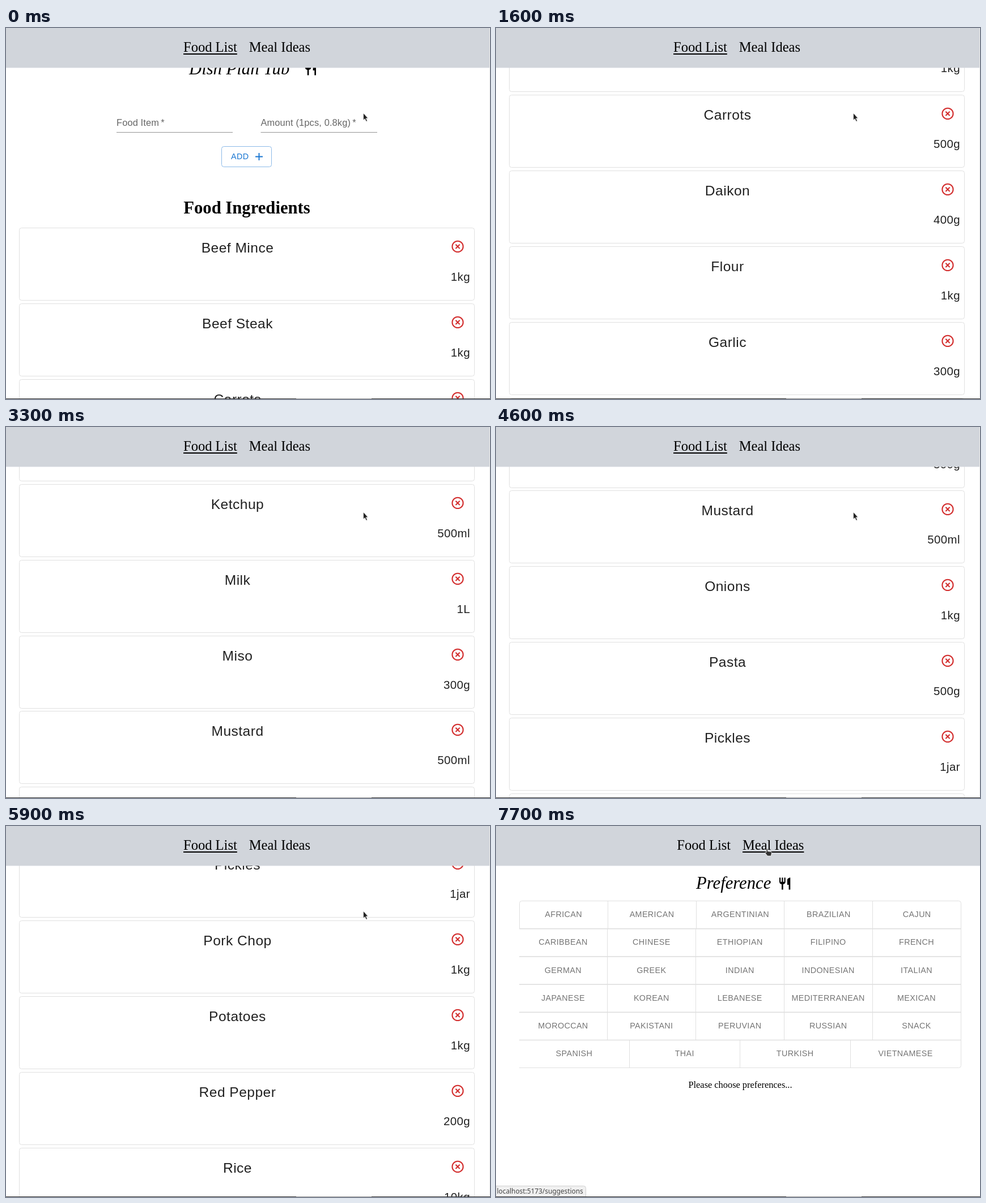
Recreate the animation shown at these times as an HTML page. Size 854 px wide and 656 px high, loop 8000 ms.

```html
<!DOCTYPE html>
<html lang="en">
<head>
<meta charset="utf-8">
<title>Food list</title>
<style>
  html, body { margin: 0; width: 100%; height: 100%; overflow: hidden; background: #fff; }
  svg { display: block; }
  .serif { font-family: "Liberation Serif", serif; }
  .sans { font-family: "Liberation Sans", sans-serif; }
  .nav { font-size: 24.55px; }
  .title { font-size: 30.68px; font-style: italic; }
  .heading { font-size: 30.68px; font-weight: bold; }
  .note { font-size: 16.36px; }
  .label { font-size: 16.36px; letter-spacing: .00938em; fill: #666; }
  .button { font-size: 14.32px; letter-spacing: .02857em; }
  .food { font-size: 24.54px; letter-spacing: .02em; fill: #212121; }
  .amount { font-size: 20.45px; letter-spacing: .02em; fill: #212121; }
  .status { font: 11.85px "Noto Sans", sans-serif; fill: #444; }
  .middle { text-anchor: middle; }
  .end { text-anchor: end; }
  .line { fill: none; stroke: #e0e0e0; }
</style>
</head>
<body>
<svg width="854" height="656" viewBox="0 0 854 656">
  <defs>
    <path id="cutlery" transform="scale(1.07)" d="M11 9H9V2H7v7H5V2H3v7c0 2.12 1.66 3.84 3.75 3.97V22h2.5v-9.03C11.34 12.84 13 11.12 13 9V2h-2v7zm5-3v8h2.5v8H21V2c-2.76 0-5 2.24-5 4z"/>
    <g id="remove" fill="none" stroke="#d32f2f" stroke-width="2.1">
      <circle r="9.6"/>
      <path d="M-3.6-3.6 3.6 3.6M3.6-3.6-3.6 3.6"/>
    </g>
  </defs>

  <g id="foodPage">
    <text class="serif title" x="323" y="111">Dish Plan Tub</text>
    <use href="#cutlery" x="524.5" y="89"/>
    <text class="sans label" x="195" y="202">Food Item<tspan dx="3.3">*</tspan></text>
    <text class="sans label" x="449.5" y="202">Amount (1pcs, 0.8kg)<tspan dx="3.3">*</tspan></text>
    <path d="M195 213.5H400M449.5 213.5H655" stroke="#949494"/>
    <rect x="380.5" y="238.5" width="88" height="36" rx="4" fill="none" stroke="#8cbae8"/>
    <text class="sans button" x="397" y="261" fill="#1976d2">ADD</text>
    <path d="M440 256.5H453M446.5 250V263" stroke="#1976d2" stroke-width="1.9"/>
    <text class="serif heading middle" x="425" y="357">Food Ingredients</text>
    <g id="cards"></g>
  </g>

  <g id="mealPage">
    <text class="serif title" x="353" y="111">Preference</text>
    <use href="#cutlery" x="496.8" y="89"/>
    <path class="line" d="M41.5 181V136.5q0-4 4-4H816.5q4 0 4 4V423.5q0 4-4 4H41"/>
    <g id="cuisines"></g>
    <text class="serif note middle" x="431" y="463">Please choose preferences...</text>
  </g>

  <rect id="scrollbar" x="853" width="1" height="656" fill="#ececec"/>
  <rect id="header" width="853" height="70.4" fill="#d1d5db"/>
  <g id="nav" class="serif nav">
    <text x="313" y="42">Food List</text>
    <text x="428.7" y="42">Meal Ideas</text>
    <rect id="underline" y="45" height="2"/>
  </g>

  <g id="status">
    <path d="M0 636.5H154.5q4 0 4 4V656H0z" fill="#f0f0f0" stroke="#d0d0d0"/>
    <text class="status" x="1.5" y="650">localhost:5173/suggestions</text>
  </g>
  <path d="M0 655.5H512M645 655.5H854" stroke="#333"/>
  <path d="M512 655.5H645" stroke="#999"/>

  <path id="arrow" d="M0 0V12.5L2.8 10 5 14.8 7 13.9 4.9 9.2H8.4z" fill="#222" stroke="#fff" stroke-width=".7"/>
  <path id="hand" d="M0 1.2Q1.2-.8 2.4 1.2V5L8 6Q9.6 6.4 9.4 8.2L8.4 13.5H2L-2 8.4Q-2.2 6.6-.6 7L0 7.6z" fill="#333" stroke="#fff" stroke-width=".8"/>
</svg>
<script>
const DURATION = 8000, STEP = 100;
const $ = id => document.getElementById(id);

const foods = `Beef Mince:1kg Beef Steak:1kg Carrots:500g Daikon:400g Flour:1kg
  Garlic:300g Ginger:300g Ketchup:500ml Milk:1L Miso:300g Mustard:500ml Onions:1kg
  Pasta:500g Pickles:1jar Pork Chop:1kg Potatoes:1kg Red Pepper:200g Rice:10kg
  Soy Sauce:500ml Tomatoes:500g`.match(/[A-Z][A-Za-z ]*:\w+/g).map(s => s.split(':'));

$('cards').innerHTML = foods.map(([name, amount], i) => `
  <g transform="translate(0 ${Math.round(382.4 + 133.9 * i)})">
    <rect class="line" x="23.5" y=".5" width="803" height="128" rx="4"/>
    <text class="sans food middle" x="408.5" y="44">${name}</text>
    <use href="#remove" x="797" y="33.4"/>
    <text class="sans amount end" x="819" y="94">${amount}</text>
  </g>`).join('');

const cuisines = [
  'African American Argentinian Brazilian Cajun',
  'Caribbean Chinese Ethiopian Filipino French',
  'German Greek Indian Indonesian Italian',
  'Japanese Korean Lebanese Mediterranean Mexican',
  'Moroccan Pakistani Peruvian Russian Snack',
  'Spanish Thai Turkish Vietnamese'
].map(row => row.toUpperCase().split(' '));

$('cuisines').innerHTML = cuisines.map((row, r) => {
  const top = 132.5 + 49.2 * r, width = 779.5 / row.length;
  const left = r ? 40.5 : 41.2;
  const rule = r ? `<path class="line" stroke-width="1.7" d="M41 ${top}H820.5"/>` : '';
  return rule + row.map((name, c) => {
    const x = left + width * c;
    const divider = c ? `<path class="line" d="M${Math.floor(x) + .5} ${top}v49"/>` : '';
    return `${divider}<text class="sans button middle" fill="#757575"
      x="${x + width / 2}" y="${Math.round(top + 28.7)}">${name}</text>`;
  }).join('');
}).join('');

// [time, value] pairs
const scrollKeys = [
  [0, 29], [600, 260], [700, 268], [1200, 268], [1500, 515], [1600, 532],
  [1900, 532], [2300, 779], [2400, 870], [2500, 903], [2800, 903], [3000, 1150],
  [3100, 1217], [3200, 1217], [3300, 1219], [3700, 1219], [3900, 1490], [4000, 1536],
  [4500, 1536], [4600, 1609], [4900, 1805], [5000, 1830], [5200, 1830],
  [5900, 2090], [6400, 2290], [6500, 2310]
];

function valueAt(keys, t) {
  const i = keys.findIndex(([time]) => time > t);
  if (i < 0) return keys[keys.length - 1][1];
  const [t0, v0] = keys[i - 1], [t1, v1] = keys[i];
  return v0 + (v1 - v0) * (t - t0) / (t1 - t0);
}

const show = (id, visible) => $(id).setAttribute('visibility', visible ? 'visible' : 'hidden');
const move = (id, x, y) => $(id).setAttribute('transform', `translate(${x} ${y})`);

function draw(t) {
  const onMeals = t >= 7600;
  show('foodPage', !onMeals);
  show('mealPage', onMeals);
  show('scrollbar', !onMeals);
  move('foodPage', 0, -Math.round(valueAt(scrollKeys, t)));

  $('header').setAttribute('width', onMeals ? 854 : 853);
  move('nav', onMeals ? 6.3 : 0, 0);
  $('underline').setAttribute('x', onMeals ? 428.7 : 313);
  $('underline').setAttribute('width', onMeals ? 108.4 : 94.8);
  $('status').setAttribute('opacity', Math.min(1, Math.max(0, (t - 7100) / 200)));

  const p = Math.min(1, Math.max(0, (t - 6300) / 700));
  const ease = p * p * (3 - 2 * p);
  const x = 630.5 - 153.5 * ease, y = 150.5 - 111 * ease;
  const overLink = y < 48;
  show('arrow', !overLink);
  show('hand', overLink);
  move('arrow', x, y);
  move('hand', x, y);
}

function tick() {
  const t = performance.now() % DURATION;
  draw(Math.floor(t / STEP) * STEP);
  requestAnimationFrame(tick);
}
tick();
</script>
</body>
</html>
```
